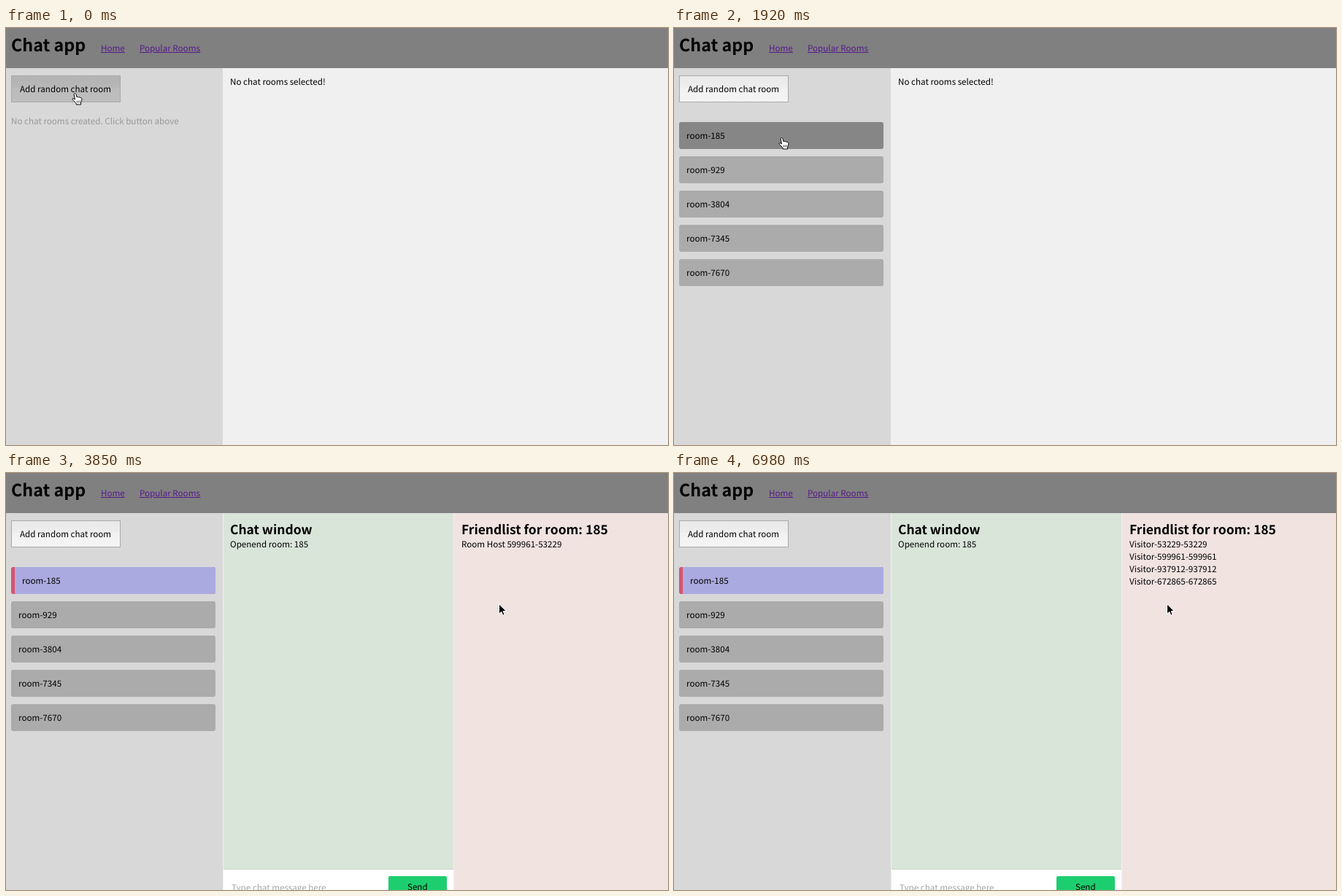
Recreate the animation shown at these times as an HTML page. Size 907x572 px, loop 8 s.

```html
<!DOCTYPE html>
<html lang="en">
<head>
<meta charset="utf-8">
<title>Chat app</title>
<style>
  html, body { margin: 0; width: 100%; height: 100%; overflow: hidden; background: #f0f0f0; }
  svg { display: block; width: 907px; height: 572px; }
  text {
    font-family: "Noto Sans CJK JP", "Noto Sans CJK SC", "Noto Sans CJK KR", "Noto Sans CJK", sans-serif;
    font-size: 11.64px;
    text-rendering: geometricPrecision;
    white-space: pre;
  }
  .h1 { font-size: 23.28px; font-weight: 700; }
  .h2 { font-size: 17.46px; font-weight: 700; }
  .link { fill: #551a8b; }
  .dim { fill: #989898; }
  .hint { fill: #a6a6a6; }
</style>
</head>
<body>
<svg viewBox="0 0 907 572">
  <defs>
    <linearGradient id="up" x2="0" y2="1">
      <stop stop-color="#e9e9e9"/><stop offset=".45" stop-color="#eeeeee"/>
      <stop offset=".45" stop-color="#f2f2f2"/><stop offset="1" stop-color="#f4f4f4"/>
    </linearGradient>
    <linearGradient id="down" x2="0" y2="1">
      <stop stop-color="#b3b3b3"/><stop offset=".45" stop-color="#b7b7b7"/>
      <stop offset=".45" stop-color="#bbbbbb"/><stop offset="1" stop-color="#bebebe"/>
    </linearGradient>
  </defs>
  <rect width="907" height="572" fill="#f0f0f0"/>
  <rect width="297" height="572" fill="#d8d8d8"/>
  <rect width="907" height="55" fill="#808080"/>
  <text class="h1" x="7" y="32">Chat app</text>
  <text class="link" x="130" y="32">Home</text>
  <text class="link" x="183" y="32">Popular Rooms</text>
  <path d="M130 33.5h33M183 33.5h14M201.500 33.5h65" stroke="#551a8b"/>
  <g id="view"></g>
</svg>
<script>
const LOOP = 8000;
const view = document.getElementById('view');

const sorted = ['929', '3804', '7345', '7670'];
const all = ['185', ...sorted];
const visitors = ['53229', '599961', '937912', '672865'].map(n => `Visitor-${n}-${n}`);

// Each step changes only the listed parts of the state.
const steps = [
  { t: 0, pressed: true, rooms: [], alpha: [], hover: false, open: false, people: [], cursor: ['hand', 90, 89] },
  { t: 140, pressed: false, rooms: sorted, alpha: [.5] },
  { t: 290, alpha: [1] },
  { t: 740, alpha: [1, .87, .09] },
  { t: 890, alpha: [1, 1, .95, .92] },
  { t: 1040, pressed: true, alpha: [1, 1, .98, 1] },
  { t: 1190, alpha: [1, 1, 1, 1] },
  { t: 1330, pressed: false, rooms: all, alpha: [1, 1, 1, 1, 1] },
  { t: 1480, cursor: ['hand', 143, 167] },
  { t: 1630, cursor: ['hand', 148, 176] },
  { t: 1770, hover: true, cursor: ['hand', 143, 153] },
  { t: 1920, cursor: ['hand', 143, 150] },
  { t: 2060, open: true, people: ['Room Host 743-1'] },
  { t: 2510, cursor: ['hand', 240, 146] },
  { t: 2660, cursor: ['arrow', 597, 255] },
  { t: 2810, cursor: ['arrow', 673, 130] },
  { t: 2960, cursor: ['beam', 705, 83] },
  { t: 3110, people: ['Room Host 599961-53229'] },
  { t: 3550, cursor: ['arrow', 687, 111] },
  { t: 3700, cursor: ['arrow', 670, 175] },
  { t: 3850, cursor: ['arrow', 675, 179] },
  { t: 3990, people: visitors.slice(0, 1) },
  { t: 5040, people: visitors.slice(0, 2) },
  { t: 6080, people: visitors.slice(0, 3) },
  { t: 6980, people: visitors },
];

const cursors = {
  hand: `<path d="M3.200 1.600C3.400 .300 5.300 .200 5.800 1.500L7.200 6C7.800 5 9.200 5.200 9.600 6.200
    10.300 5.400 11.600 5.800 11.800 6.800 12.800 6.400 13.800 7 13.900 8.200 14.100 10.600 13.200 12 12.600 13.400
    L12.600 16H6.200L6 14.200C4.600 12.800 3.400 11.200 1.200 9.400 .400 8.400 1.400 7.200 2.800 7.800L4.400 9Z"
    fill="#fff" stroke="#000" stroke-linejoin="round"/>
    <path d="M7.500 10.500v3M9.500 10.500v3M11.500 10.500v3" stroke="#000" stroke-width=".7"/>`,
  arrow: `<path d="M.500 .800V14.200L3.700 11.300 5.900 16.300 8.100 15.300 6 10.500H10.200Z"
    fill="#000" stroke="#fff" stroke-linejoin="round"/>`,
  beam: `<path d="M1 .500C2.500 .500 3.500 1 3.500 2.500V12C3.500 13.500 2.500 14 1 14M6 .500C4.500 .500 3.500 1 3.500 2.500
    M3.500 12C3.500 13.500 4.500 14 6 14M2 9.500H5" fill="none" stroke="#000"/>`,
};

const rect = (x, y, w, h, fill, extra = '') =>
  `<rect x="${x}" y="${y}" width="${w}" height="${h}" fill="${fill}" ${extra}/>`;
const text = (x, y, str, cls = '') => `<text x="${x}" y="${y}" class="${cls}">${str}</text>`;

function row(name, i, s) {
  const y = 129 + 47 * i;
  const active = s.open && i === 0;
  const fill = active ? '#d9536b' : s.hover && i === 0 ? '#868686' : '#ababab';
  const body = active
    ? `<path d="M12 ${y}H284q3 0 3 3v31q0 3-3 3H12z" fill="#aaaae0"/>` : '';
  return `<g opacity="${s.alpha[i]}">${rect(7, y, 280, 37, fill, 'rx="3"')}${body}
    ${text(active ? 22 : 17, y + 23, 'room-' + name)}</g>`;
}

function room(s) {
  return rect(298, 55, 315, 489, '#d9e5d9')
    + rect(614, 55, 293, 517, '#f0e3e0')
    + rect(298, 543, 315, 1, '#cbd6cb')
    + rect(298, 544, 315, 28, '#fff')
    + rect(524, 553, 80, 30, '#1dce6f', 'rx="2"')
    + text(307, 84, 'Chat window', 'h2')
    + text(307, 102, 'Openend room: 185')
    + text(309, 573, 'Type chat message here', 'hint')
    + text(550, 572, 'Send')
    + text(624, 84, 'Friendlist for room: 185', 'h2')
    + s.people.map((p, i) => text(624, 102 + 17 * i, p)).join('');
}

function render(s) {
  const [shape, x, y] = s.cursor;
  view.innerHTML =
    rect(7.5, 65.5, 149, 36, `url(#${s.pressed ? 'down' : 'up'})`, 'stroke="#a9a9a9"')
    + text(19, 88, 'Add random chat room')
    + (s.alpha.length ? s.alpha.map((_, i) => row(s.rooms[i], i, s)).join('')
      : text(7, 132, 'No chat rooms created. Click button above', 'dim'))
    + (s.open ? room(s) : text(307, 78, 'No chat rooms selected!'))
    + `<g transform="translate(${x} ${y})">${cursors[shape]}</g>`;
}

let shown = -1;
function tick() {
  const t = performance.now() % LOOP;
  const n = steps.filter(s => s.t <= t).length;
  if (n !== shown) {
    shown = n;
    render(Object.assign({}, ...steps.slice(0, n)));
  }
  requestAnimationFrame(tick);
}
tick();
</script>
</body>
</html>
```
